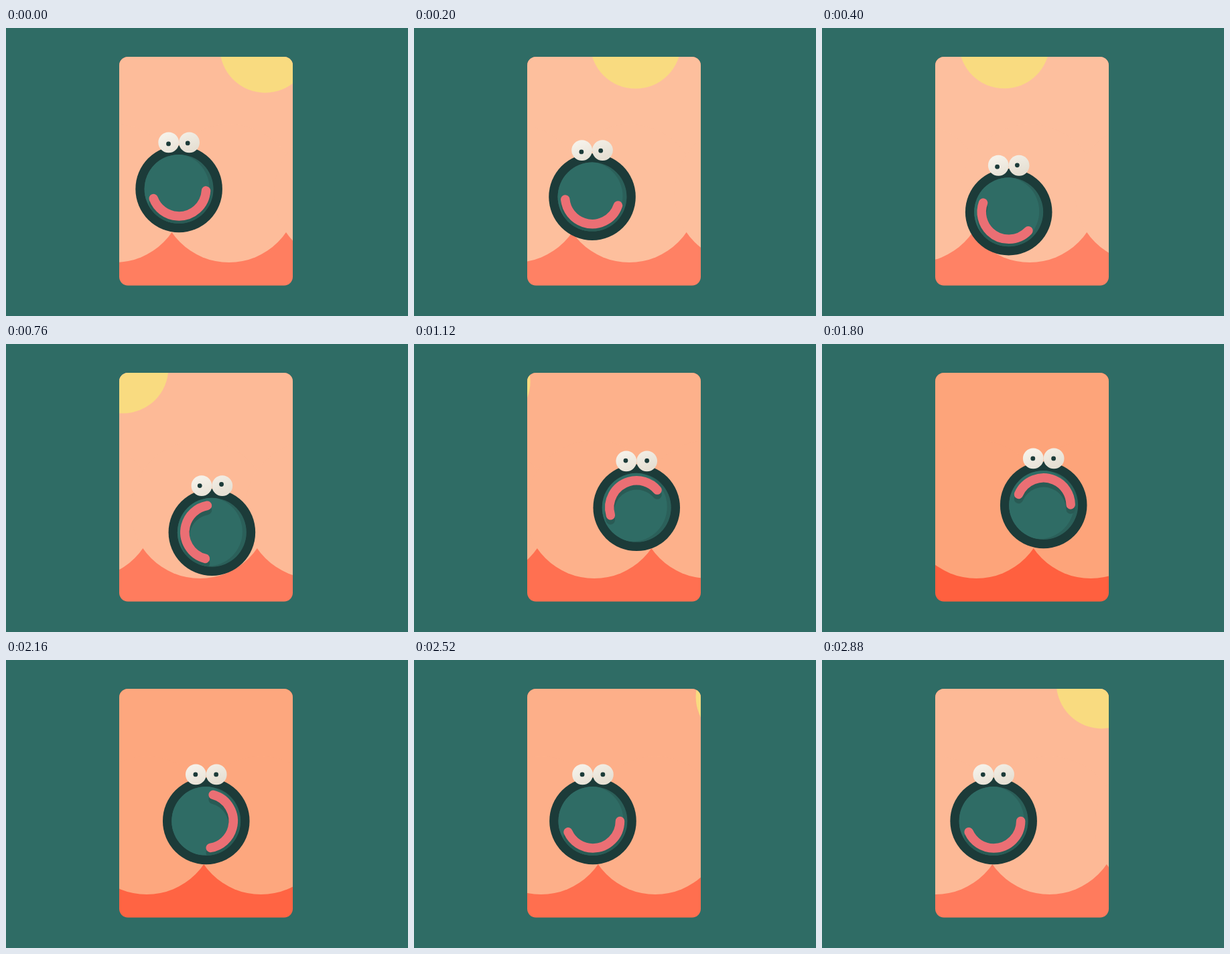
Write an HTML page with a canvas that moves like this. It is 600 px wide and 430 px high and loops after 2920 ms.

```html
<!DOCTYPE html>
<html>
<head>
<meta charset="utf-8">
<title>Rolling ball</title>
<style>
html, body { margin: 0; width: 600px; height: 430px; overflow: hidden; background: #2f6c65; }
canvas { display: block; }
</style>
</head>
<body>
<canvas id="stage" width="600" height="430"></canvas>
<script>
const ctx = document.getElementById('stage').getContext('2d');
const TAU = Math.PI * 2, RAD = Math.PI / 180;
const LOOP = 2920, STEP = 40, CYCLE = 3000;
const TIP_GAP = 170.5, TIP_Y = 305, BOWL_R = 103.2, BOWL_Y = 246.8;
const TEAL = '#2f6c65', DARK = '#1c3b39';

// Sine ease from 0 to 1 between two times
function ease(t, start, end) {
  const u = Math.min(1, Math.max(0, (t - start) / (end - start)));
  return (1 - Math.cos(Math.PI * u)) / 2;
}

// The same ease, adding one more step in the following cycle
const move = (t, start, end) => ease(t, start, end) + ease(t - CYCLE, start, end);

const ballX = t => 256 + 86 * (move(t, -165, 1480) - move(t, 1480, 2835));
const ballY = t => 240.4 + 44 * (move(t, 0, 580) - move(t, 660, 1230));
const spin = t => 78 + 203 * move(t, -150, 1640) + 157 * move(t, 1780, 2520);
const sunAngle = t => 23 - 46 * (move(t, -900, 1520) % 1);
const pupilSwing = t => 2.3 * (move(t, -160, 40) - move(t, 700, 1400));

function disc(x, y, r, fill) {
  ctx.fillStyle = fill;
  ctx.beginPath();
  ctx.arc(x, y, r, 0, TAU);
  ctx.fill();
}

function drawScene(t) {
  const warmth = Math.cos(TAU * (t - 340) / CYCLE);
  const sky = `rgb(253,${177.5 + 14 * warmth},${140 + 18 * warmth})`;
  ctx.save();
  ctx.beginPath();
  ctx.roundRect(169, 43, 259, 341.5, 13);
  ctx.clip();

  ctx.fillStyle = `rgb(255,${113 + 17 * warmth},${82 + 19 * warmth})`;
  ctx.fillRect(160, 40, 280, 350);
  ctx.fillStyle = sky;
  ctx.fillRect(160, 40, 280, TIP_Y - 40);
  const tip = 247.5 - TIP_GAP * t / CYCLE;
  for (let i = -1; i < 3; i++) disc(tip + TIP_GAP * (i + .5), BOWL_Y, BOWL_R, sky);

  const a = sunAngle(t) * RAD;
  disc(298.5 + 564 * Math.sin(a), 586 - 564 * Math.cos(a), 67.7, '#f9db80');
  ctx.restore();
}

function mouth(dy, mid, color) {
  ctx.strokeStyle = color;
  ctx.beginPath();
  ctx.arc(0, dy, 40.5, (mid - 78) * RAD, (mid + 78) * RAD);
  ctx.stroke();
}

function eye(x, swing, angle) {
  const shade = ctx.createLinearGradient(-6, -86, 6, -55);
  shade.addColorStop(0, '#f5f1e9');
  shade.addColorStop(1, '#e6e0d4');
  disc(x, -69.5, 15.4, shade);
  disc(x - .5 + swing * Math.cos(angle * RAD), -69.5 + swing * Math.sin(angle * RAD), 3.4, DARK);
}

function drawBall(t) {
  const turn = spin(t), swing = pupilSwing(t);
  ctx.save();
  ctx.translate(ballX(t), ballY(t));
  disc(0, 0, 64.8, DARK);

  ctx.save();
  ctx.beginPath();
  ctx.arc(0, 0, 51.5, 0, TAU);
  ctx.clip();
  disc(0, 0, 52, '#2b605a');
  disc(-6, -1, 51.5, TEAL);
  ctx.lineWidth = 13.5;
  ctx.lineCap = 'round';
  mouth(7, turn, '#295b55');
  mouth(0, turn, '#eb6f74');
  ctx.restore();

  eye(-15.4, swing, turn);
  eye(15.4, swing, turn + 70);
  ctx.restore();
}

function frame() {
  const t = Math.floor(performance.now() % LOOP / STEP) * STEP;
  ctx.fillStyle = TEAL;
  ctx.fillRect(0, 0, 600, 430);
  drawScene(t);
  drawBall(t);
  requestAnimationFrame(frame);
}
frame();
</script>
</body>
</html>
```
